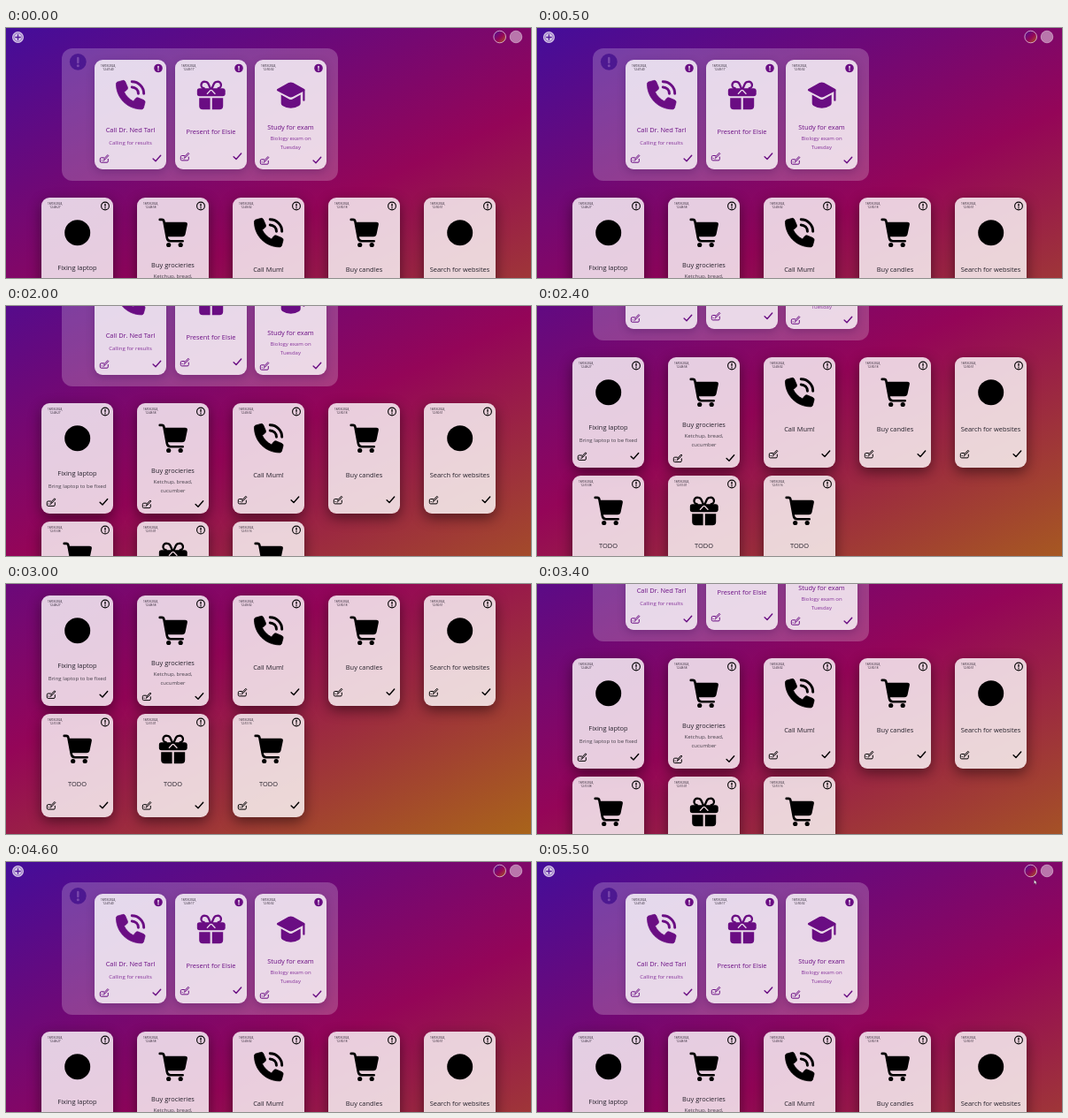
An HTML page for the animation above (5600 ms loop, 593 px wide and 283 px high).

```html
<!DOCTYPE html>
<html lang="en">
<head>
<meta charset="utf-8">
<title>Todo board</title>
<style>
  html, body { margin: 0; width: 100%; height: 100%; overflow: hidden; background: #450d98; }
  #stage { position: relative; width: 100%; height: 100%; overflow: hidden; contain: strict; }
  #page {
    position: absolute; left: 0; top: 0; width: 593px; height: 462px;
    background: linear-gradient(155deg, #440d9a, #940558 50%, #a9641a);
  }
  .panel {
    position: absolute; left: 62.5px; top: 23px; width: 312.5px; height: 150px;
    border-radius: 12px; background: rgba(255, 255, 255, .21);
  }
  .card {
    position: absolute; width: 81px; border-radius: 9px;
    background: rgba(255, 255, 255, .8);
    box-shadow: 0 5px 15px rgba(0, 0, 0, .48);
    --ink: #000; --title: #24202a; --body: #46404a;
  }
  .card.urgent {
    --ink: #6a0d83; --title: #6a0d83; --body: #85329a;
    box-shadow: 0 3px 10px rgba(40, 0, 70, .26);
  }
  svg { display: block; }
  .defs { position: absolute; width: 0; height: 0; }
  .head { position: absolute; left: 0; top: 0; }
  .card svg { color: var(--ink); fill: currentColor; }
  text { font-family: "Open Sans", "Noto Sans", sans-serif; text-anchor: middle; }
  .date { font-size: 3.1px; fill: #1c1522; }
  .title { font-size: 7.45px; font-weight: 500; fill: var(--title); }
  .body { font-size: 6px; fill: var(--body); }
  .line { fill: none; stroke: currentColor; stroke-linecap: round; stroke-linejoin: round; }
  .solid { stroke: currentColor; stroke-linejoin: round; }
  #cursor { position: absolute; left: 560.5px; top: 19.5px; visibility: hidden; }
</style>
</head>
<body>
<div id="stage">
<svg class="defs">
  <defs>
    <linearGradient id="theme" x1="0" y1="0" x2="1" y2="1">
      <stop offset="0" stop-color="#4a0d98"/>
      <stop offset=".55" stop-color="#940558"/>
      <stop offset="1" stop-color="#a9641a"/>
    </linearGradient>
    <mask id="knot" maskUnits="userSpaceOnUse" x="0" y="0" width="33" height="33">
      <rect width="33" height="33" fill="#fff"/>
      <path d="M16.500 10.500L11.800 15.500M16.500 10.500L21.200 15.500" fill="none" stroke="#000" stroke-width="1.300"/>
    </mask>
    <g id="phone" transform="scale(.0645)">
      <path class="solid" stroke-width="12" d="M117.500 4c19-5 38 4 46 22l40 95c6 16 2 34-12 45L144 207c33 70 90 127 161 161l40-49c11-14 30-18 46-12l95 40c18 8 27 27 22 46l-24 87c-4 16-18 27-36 27C201 508 4 311 4 64c0-17 11-32 27-36z"/>
      <path class="line" stroke-width="46" d="M280 24A208 208 0 0 1 488 232M280 120A112 112 0 0 1 392 232"/>
    </g>
    <g id="cart">
      <path class="line" stroke-width="2.600" d="M1.500 1.700h2.300q2 0 2.400 2l3.400 18.500q.7 3.800 4 3.800H27.500"/>
      <path d="M6.300 4.500H30q3.200 0 2.600 3l-2.200 10.600q-.6 3-3.600 3H9.400z"/>
      <circle cx="11.500" cy="30.300" r="2.600"/>
      <circle cx="25" cy="30.300" r="2.600"/>
    </g>
    <g id="gift">
      <path class="line" stroke-width="2.300" d="M15.800 9.500L13.400 4Q12.200 1.400 9.500 1.600A3.700 3.700 0 0 0 8.500 9M17.200 9.500L19.600 4Q20.800 1.400 23.500 1.600A3.700 3.700 0 0 1 24.500 9"/>
      <rect x=".5" y="9" width="32" height="9" rx="3" mask="url(#knot)"/>
      <path d="M3 20H15.400V33H7q-4 0-4-4zM17.600 20H30V29q0 4-4 4H17.600z"/>
    </g>
    <g id="cap">
      <path class="solid" stroke-width="2.600" d="M2 11L14.500 4q2-1 4 0L31 11 18.500 17.500q-2 1-4 0z"/>
      <path d="M5.500 16.400l9 4.800q2 1 4 0l9-4.800V26q0 1.600-1.600 2.700-9.400 5.800-18.800 0Q5.500 27.600 5.500 26z"/>
      <path class="line" stroke-width="2.200" d="M31.200 11.500V22.500"/>
    </g>
    <circle id="dot" cx="16.500" cy="16.500" r="14.500"/>
    <g id="bang">
      <path class="line" stroke-width="1.200" d="M0-2.200V.4"/>
      <circle cy="2.200" r=".75"/>
    </g>
    <g id="edit" class="line" stroke-width="1">
      <path d="M-.6-.8H-3.400Q-4.700-.8-4.700.5V3.300Q-4.700 4.600-3.400 4.600H3Q4.300 4.600 4.300 3.300V.8"/>
      <path d="M-.2 1.500l.3-1.500 3.700-4 1 1-3.700 4zM-2.900 2.200h.2M-.9 2.700h.2"/>
    </g>
    <path id="check" class="line" stroke-width="1.400" d="M-4.200.4L-1.300 3.200 4.400-3.300"/>
  </defs>
</svg>

<div id="page">
  <div class="panel"></div>
  <svg class="head" width="593" height="60">
    <circle cx="13.500" cy="10.500" r="6.500" fill="#fff" fill-opacity=".78"/>
    <g fill="none" stroke="#51189a">
      <circle cx="13.500" cy="10.500" r="4.700" stroke-width=".6"/>
      <path stroke-width="1.300" d="M13.500 7.300v6.400M10.300 10.500h6.400"/>
    </g>
    <circle cx="557.700" cy="10" r="6.800" fill="url(#theme)" stroke="#fff" stroke-opacity=".6"/>
    <circle cx="576" cy="10" r="6.800" fill="#fff" fill-opacity=".45" stroke="#fff" stroke-opacity=".4"/>
    <circle cx="81.300" cy="38.300" r="9.400" fill="#48148f" fill-opacity=".9"/>
    <g transform="translate(81.300 38.300) scale(2)" fill="#7a48ac" color="#7a48ac"><use href="#bang"/></g>
  </svg>
  <svg id="cursor" width="5" height="6">
    <path d="M.5.300V4.800L1.600 3.800 2.400 5.400 3.100 5 2.400 3.500H3.700z" fill="#fff" stroke="#222" stroke-width=".3"/>
  </svg>
</div>
</div>

<script>
const LOOP = 5600, STEP = 100, TICK = 280;
const page = document.getElementById('page');
const cursor = document.getElementById('cursor');

const card = (x, y, h, icon, time, title, titleY, actionY, body = [], urgent = false) => {
  const el = document.createElement('div');
  el.className = urgent ? 'card urgent' : 'card';
  el.style.cssText = `left:${x}px;top:${y}px;height:${h}px`;
  const badge = urgent
    ? '<circle r="4.8"/><g style="fill:#fff;color:#fff"><use href="#bang"/></g>'
    : '<circle r="4.4" class="line" stroke-width="1.100"/><use href="#bang"/>';
  const bodyY = body.length > 1 ? 91.3 : 95.6;
  const lines = body.map((s, i) =>
    `<text class="body" x="40.5" y="${bodyY + i * 9.3}">${s}</text>`).join('');
  el.innerHTML = `<svg width="81" height="${h}">
    <text class="date" x="15.5" y="7.8">18/03/2024,</text>
    <text class="date" x="15.5" y="12.4">${time}</text>
    <g transform="translate(72 9.5)">${badge}</g>
    <use href="#${icon}" x="24.2" y="23.2"/>
    <text class="title" x="40.5" y="${titleY}">${title}</text>${lines}
    <use href="#edit" x="11" y="${actionY}"/>
    <use href="#check" x="70.3" y="${actionY}"/>
  </svg>`;
  page.insertBefore(el, cursor);
};

const urgent = (i, ...rest) => card(100 + i * 90.7, 35.5, 124.5, ...rest, true);
urgent(0, 'phone', '12:47:40', 'Call Dr. Ned Tarl', 81.7, 111.6, ['Calling for results']);
urgent(1, 'gift', '12:49:17', 'Present for Elsie', 84.2, 109.3, []);
urgent(2, 'cap', '12:50:02', 'Study for exam', 79.4, 113.6, ['Biology exam on', 'Tuesday']);

const normal = (i, ...rest) => card(40 + i * 108, 191.5, 125, ...rest);
normal(0, 'dot', '12:48:27', 'Fixing laptop', 81.7, 111.8, ['Bring laptop to be fixed']);
normal(1, 'cart', '12:48:58', 'Buy grocieries', 79.4, 114, ['Ketchup, bread,', 'cucumber']);
normal(2, 'phone', '12:49:02', 'Call Mum!', 84.2, 109.3);
normal(3, 'cart', '12:50:18', 'Buy candles', 84.2, 109.3);
normal(4, 'dot', '12:50:51', 'Search for websites', 84.2, 109.3);

[['cart', '12:51:08'], ['gift', '12:51:01'], ['cart', '12:51:16']].forEach(([icon, time], i) =>
  card(40 + i * 108, 326, 117, icon, time, 'TODO', 82.2, 103.5));

// Wheel ticks: start time and distance scrolled.
const ticks = [
  [1540, 46], [1851, 46], [2200, 46], [2720, 41],
  [3010, -46], [3310, -47], [3450, -46], [3828, -40]
];
const easeOut = u => 1 - (1 - u) ** 2;
const scrollAt = t => ticks.reduce((sum, [start, d]) =>
  sum + d * easeOut(Math.min(1, Math.max(0, (t - start) / TICK))), 0);

function draw() {
  const t = Math.floor(performance.now() % LOOP / STEP) * STEP;
  page.style.transform = `translateY(${-Math.round(scrollAt(t))}px)`;
  cursor.style.visibility = t >= 5500 ? 'visible' : 'hidden';
  requestAnimationFrame(draw);
}
draw();
</script>
</body>
</html>
```
